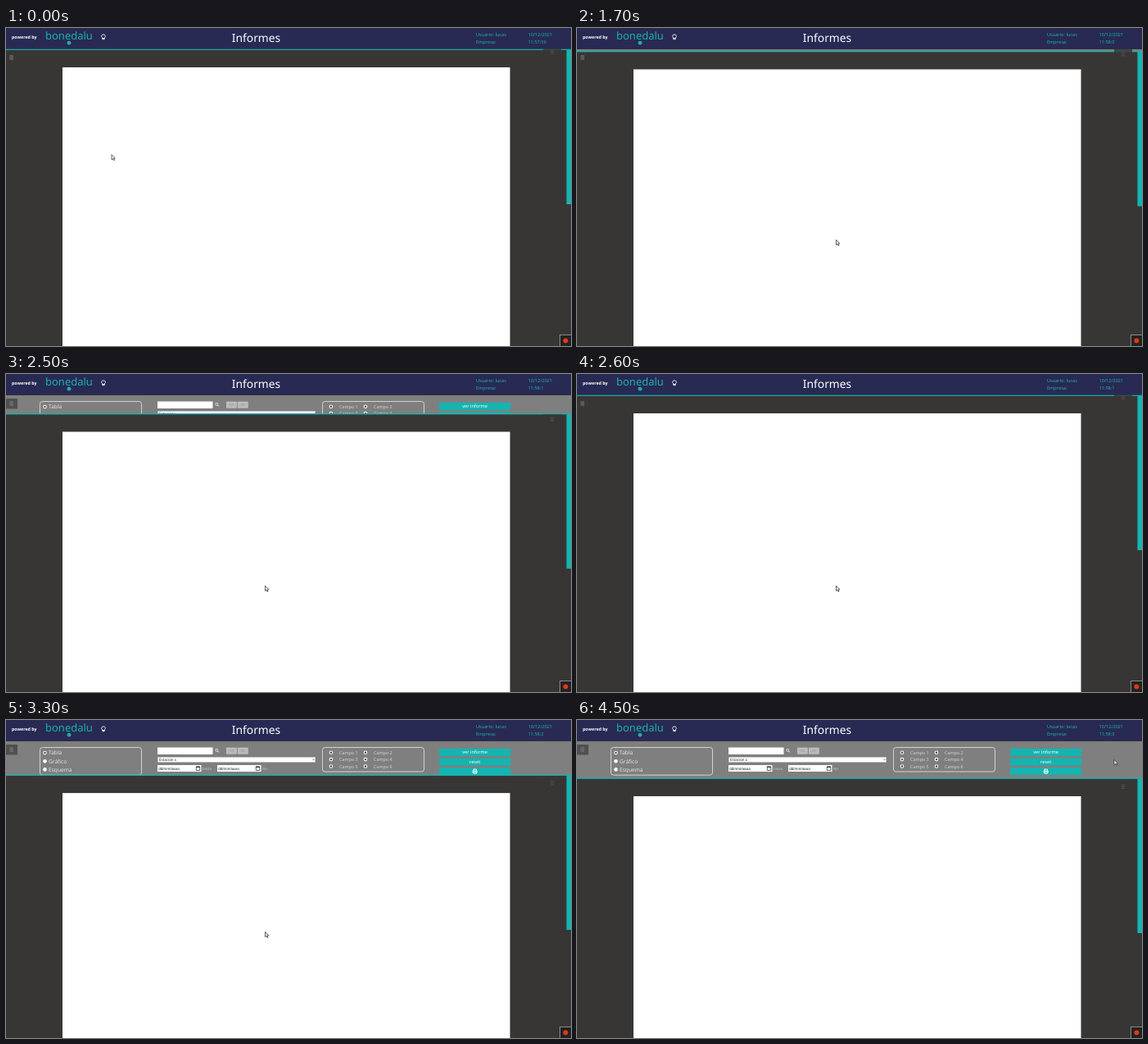
An HTML page that plays this animation: 690x388 px, repeating every 4700 ms.

```html
<!DOCTYPE html>
<html lang="es">
<head>
<meta charset="utf-8">
<title>Informes</title>
<style>
  html, body { margin: 0; width: 100%; height: 100%; overflow: hidden; background: #383635; }
  svg { display: block; width: 100vw; height: 100vh; }
  text { font-family: "Noto Sans", "Open Sans", sans-serif; text-rendering: geometricPrecision; white-space: pre; }
  .date { font-family: "Liberation Sans", Arial, sans-serif; }
</style>
</head>
<body>
<svg id="stage" viewBox="0 0 690 388">
  <defs>
    <clipPath id="clip"><rect id="clipBox" x="0" y="26" width="690" height="0"/></clipPath>
    <g id="bars" fill="none" stroke-width=".9"><path d="M-2.3-2H2.3M-2.3 0H2.3M-2.3 2H2.3"/></g>
  </defs>
  <rect width="690" height="388" fill="#383635"/>

  <g id="page">
    <rect x="69" y="48" width="546.5" height="400" fill="#fff"/>
    <rect x="684.5" y="26.5" width="5.5" height="188.5" fill="#12b5b1"/>
  </g>

  <g id="drawer" clip-path="url(#clip)">
    <rect y="25" width="690" height="48" fill="#7f7f7f"/>
  </g>
  <rect id="edge" y="25.5" width="690" height="1.4" fill="#1bb0ad"/>

  <rect y="30" width="14" height="12.5" fill="#3a3838" opacity=".65"/>
  <use href="#bars" x="6.7" y="36" stroke="#858585"/>
  <g id="tool">
    <rect x="-11" y="-6" width="22" height="12" fill="#383635" opacity=".8"/>
    <use href="#bars" stroke="#565453"/>
  </g>

  <g id="header">
    <rect width="690" height="25.5" fill="#282a54"/>
    <circle cx="77" cy="18.2" r="2.4" fill="#1bb0ad"/>
    <path d="M117.8 11.9C115.6 10.3 116.6 8 119 8S122.400 10.300 120.200 11.900V13.700H117.800ZM117.800 12.500H120.200" fill="none" stroke="#fff" stroke-width=".9"/>
  </g>

  <rect x="676.5" y="374.5" width="14" height="14" fill="#232222" stroke="#8b8b8b"/>
  <circle cx="683.4" cy="381.4" r="3" fill="#dd3a17"/>

  <path id="cursor" d="M0 0V6.200L1.500 4.900L2.500 7.100L3.500 6.700L2.500 4.500H4.400Z" fill="#fff" stroke="#222" stroke-width=".7" stroke-linejoin="round"/>
</svg>
<script>
const LOOP = 4700, STEP = 100, OPEN = 45;
const $ = id => document.getElementById(id);

function add(parent, tag, attrs, content) {
  const el = document.createElementNS("http://www.w3.org/2000/svg", tag);
  for (const k in attrs) el.setAttribute(k, attrs[k]);
  if (content) el.textContent = content;
  parent.appendChild(el);
  return el;
}
const label = (parent, x, y, size, fill, content, more) =>
  add(parent, "text", { x, y, "font-size": size, fill, ...more }, content);
const box = (parent, x, y, width, height, fill, more) =>
  add(parent, "rect", { x, y, width, height, fill, ...more });
const path = (parent, d, stroke, width = .8, fill = "none") =>
  add(parent, "path", { d, stroke, "stroke-width": width, fill });
const middle = { "text-anchor": "middle" };

// Header
const head = $("header"), teal = "#1bb0ad";
label(head, 7, 13, 5.3, "#fff", "powered by", { "font-weight": 600 });
label(head, 48, 14, 13, teal, "bonedalu");
label(head, 305.5, 17, 13.8, "#fff", "Informes", middle);
label(head, 574, 10, 5.6, teal, "Usuario: lucas");
label(head, 574, 18.7, 5.6, teal, "Empresa:");
label(head, 637.5, 10, 5.6, teal, "10/12/2021");
const clock = label(head, 637.5, 18.7, 5.6, teal, "11:57:59");

// Drawer with filters
const form = $("drawer");
function radio(cx, cy, dot) {
  add(form, "circle", { cx, cy, r: 2.3, fill: "#fff" });
  if (dot) add(form, "circle", { cx, cy, r: 1.2, fill: "#444" });
}
function frame(x, y, w, h) {
  box(form, x, y, w, h, "none", { rx: 3, stroke: "#dcdcdc", "stroke-width": .9 });
}

frame(41.5, 33.5, 124, 33.7);
["Tabla", "Gráfico", "Esquema"].forEach((name, i) => {
  const y = 40 + i * 10.2;
  radio(47.5, y, i === 0);
  label(form, 52, y + 2.4, 6.6, "#e2e2e2", name);
});

box(form, 185, 33.5, 67.5, 8.5, "#fff");
add(form, "circle", { cx: 257.3, cy: 36.8, r: 1.5, fill: "none", stroke: "#eee", "stroke-width": .8 });
path(form, "M258.400 37.900L260 39.500", "#eee", 1);
["<<", ">>"].forEach((sign, i) => {
  const x = 269.3 + i * 13.8;
  box(form, x, 34, 12.2, 7.2, "#b9b9b9", { stroke: "#d2d2d2", "stroke-width": .5 });
  label(form, x + 6.1, 39.2, 4.2, "#777", sign, middle);
});
box(form, 185.2, 45.2, 192.600, 6.400, "#fff", { stroke: "#9b98a8", "stroke-width": .4 });
label(form, 187, 50.1, 4.5, "#222", "Estacion x");
path(form, "M374.300 47.800L375.500 49L376.700 47.800", "#333", .6);
[[185, "Inicio"], [258, "Fin"]].forEach(([x, name]) => {
  box(form, x, 55, 53.5, 8, "#fff");
  label(form, x + 1.2, 60.7, 4.6, "#222", "dd/mm/aaaa", { class: "date" });
  path(form, `M${x + 47.300} 57.200h4.400v4.300h-4.400z`, "#222", .7);
  path(form, `M${x + 47} 57.200h5`, "#222", 1.2);
  label(form, x + 55, 60.7, 4.3, "#cfcfcf", name);
});

frame(386.5, 33.5, 124, 29.5);
for (let i = 0; i < 6; i++) {
  const x = 397 + (i % 2) * 42, y = 39.7 + (i >> 1) * 8.4;
  radio(x, y, true);
  label(form, x + 10, y + 2.1, 5.4, "#d4d4d4", "Campo " + (i + 1));
}

["ver informe", "reset", ""].forEach((name, i) => {
  const y = 35 + i * 11.6;
  box(form, 529, y, 87.3, 8.8, "#12b5b1");
  label(form, 572.6, y + 6.3, 5.6, "#fff", name, middle);
});
path(form, "M571 62V60H574.400V62M570.900 64.300H570.100V62H575.200V64.300H574.400M571 63.500H574.400V65.300H571Z", "#fff", .9);

// Motion
const slides = [[1640, 400, 0, 1], [2400, 200, 1, 0], [3138, 200, 0, 1]];
const moves = [
  [0, 129, 154.5], [100, 241, 217], [200, 316.5, 258.5], [3500, 316.5, 258.5],
  [3600, 400, 236], [3700, 518, 197.5], [3800, 592, 140], [3900, 632, 92],
  [4000, 646, 68], [4100, 650, 60], [4300, 660, 54], [4500, 656, 48.5], [LOOP, 656, 48.5]
];
const clamp = v => Math.max(0, Math.min(1, v));
const swing = p => .5 - Math.cos(p * Math.PI) / 2;

function opening(t) {
  let v = 0;
  for (const [start, span, from, to] of slides)
    if (t >= start) v = from + (to - from) * swing(clamp((t - start) / span));
  return v;
}
function pointer(t) {
  const i = moves.findIndex(m => m[0] > t);
  const [t0, x0, y0] = moves[i - 1], [t1, x1, y1] = moves[i];
  const p = (t - t0) / (t1 - t0);
  return [x0 + (x1 - x0) * p, y0 + (y1 - y0) * p];
}
const place = (id, x, y) => $(id).setAttribute("transform", `translate(${x} ${y})`);

function draw(ms) {
  const t = Math.floor(ms % LOOP / STEP) * STEP;
  const open = opening(t), shift = open * OPEN;
  place("page", 0, shift);
  place("edge", 0, shift);
  place("tool", 667, 29 + open * 52.5);
  place("cursor", ...pointer(t));
  $("clipBox").setAttribute("height", shift);
  clock.textContent = t < 1100 ? "11:57:59" : "11:58:" + Math.floor((t - 1100) / 1000);
}

const begin = performance.now();
function tick() {
  draw(performance.now() - begin);
  requestAnimationFrame(tick);
}
tick();
</script>
</body>
</html>
```
